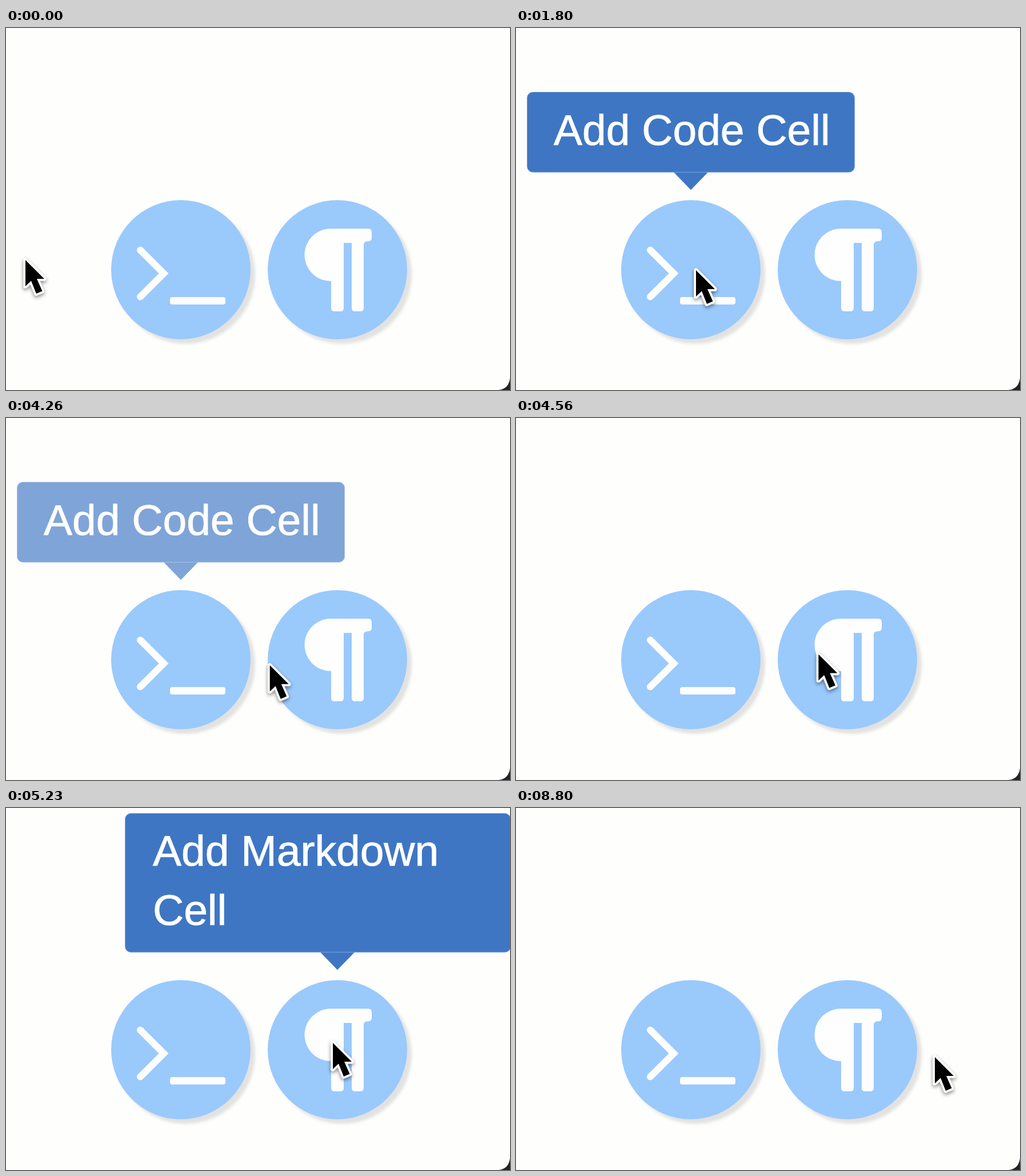
Animation of 882 by 635 pixels, one loop 9260 ms. Source, as an HTML page:

```html
<!DOCTYPE html>
<html lang="en">
<head>
<meta charset="utf-8">
<title>Add cell buttons</title>
<style>
  html, body { margin: 0; width: 100%; height: 100%; overflow: hidden; background: #fefefd; }
  svg { display: block; width: 100vw; height: 100vh; }
  .soft { filter: blur(.6px); }
  .button { fill: #9ac9fc; filter: drop-shadow(8px 8px 2.5px rgba(0, 0, 0, .11)); }
  .icon { fill: #fefefe; }
  .tip { fill: #3e76c4; opacity: 0; }
  .tip rect { stroke: #7fa5da; stroke-width: 1; }
  .tip text {
    fill: #fff; stroke: #fff; stroke-width: .9;
    font: 75px "Liberation Sans", Arial, sans-serif; text-rendering: geometricPrecision;
  }
  #cursor { filter: drop-shadow(0 3px 3px rgba(0, 0, 0, .45)); }
</style>
</head>
<body>
<svg viewBox="0 0 882 635">
  <g class="soft">
    <path d="M882 614Q880 633 862 635H882Z" fill="#222326"/>

    <circle class="button" cx="306" cy="424" r="122"/>
    <path d="M235 389.500L276 430.500L235 471.500" fill="none" stroke="#fefefe" stroke-width="12" stroke-linecap="round"/>
    <rect class="icon" x="287" y="472" width="97" height="13" rx="4"/>

    <circle class="button" cx="580" cy="424" r="122"/>
    <path class="icon" d="M568 352H634q6 0 6 6v10q0 6-6 6q-8 0-8 6V491q0 6-6 6h-9q-6 0-6-6V377H591V491q0 6-6 6h-10q-6 0-6-6V444A46 46 0 0 1 568 352Z"/>

    <g class="tip" id="codeTip">
      <path d="M276 253H336L306 284Z"/>
      <rect x="19.500" y="112.500" width="573" height="140.500" rx="10"/>
      <text x="66" y="205">Add Code Cell</text>
    </g>
    <g class="tip" id="markdownTip">
      <path d="M550 253H610L580 284Z"/>
      <rect x="208.500" y="9.500" width="674.500" height="243.500" rx="10"/>
      <text x="257" y="101">Add Markdown</text>
      <text x="257" y="205">Cell</text>
    </g>

    <g id="cursor">
      <path d="M0 0V46L10 36.500L19 59L29.500 54.500L20 33H33Z" stroke="#fff" stroke-width="7.500" stroke-linejoin="round" paint-order="stroke"/>
    </g>
  </g>
</svg>
<script>
  const LOOP = 9260, FADE = 180;
  const [cursor, codeTip, markdownTip] =
    ["cursor", "codeTip", "markdownTip"].map(id => document.getElementById(id));

  // Each move eases out to (x, y); sag bends its path downwards
  const home = { x: 34, y: 407 };
  const moves = [
    { start: 640, end: 1060, x: 315, y: 425, sag: 9, power: 2 },
    { start: 3730, end: 4660, x: 545, y: 409, sag: 21, power: 1.2 },
    { start: 4670, end: 4900, x: 572, y: 412, sag: 0, power: 2 },
    { start: 8170, end: 8800, x: 733, y: 437, sag: 0, power: 3 }
  ];

  const clamp = k => Math.min(1, Math.max(0, k));
  const ramp = (t, start) => clamp((t - start) / FADE);
  const shown = (t, enter, leave) => ramp(t, enter) - ramp(t, leave);

  function pointerAt(t) {
    let { x, y } = home;
    for (const move of moves) {
      const k = clamp((t - move.start) / (move.end - move.start));
      const e = 1 - (1 - k) ** move.power;
      x += (move.x - x) * e;
      y += (move.y - y) * e + move.sag * Math.sin(Math.PI * e);
    }
    return [x.toFixed(2), y.toFixed(2)];
  }

  function draw(now) {
    const t = Math.max(0, now - start) % LOOP;
    cursor.setAttribute("transform", `translate(${pointerAt(t)})`);
    codeTip.style.opacity = shown(t, 1615, 4200);
    markdownTip.style.opacity = shown(t, 5045, 8440);
    requestAnimationFrame(draw);
  }

  const start = performance.now();
  draw(start);
</script>
</body>
</html>
```
